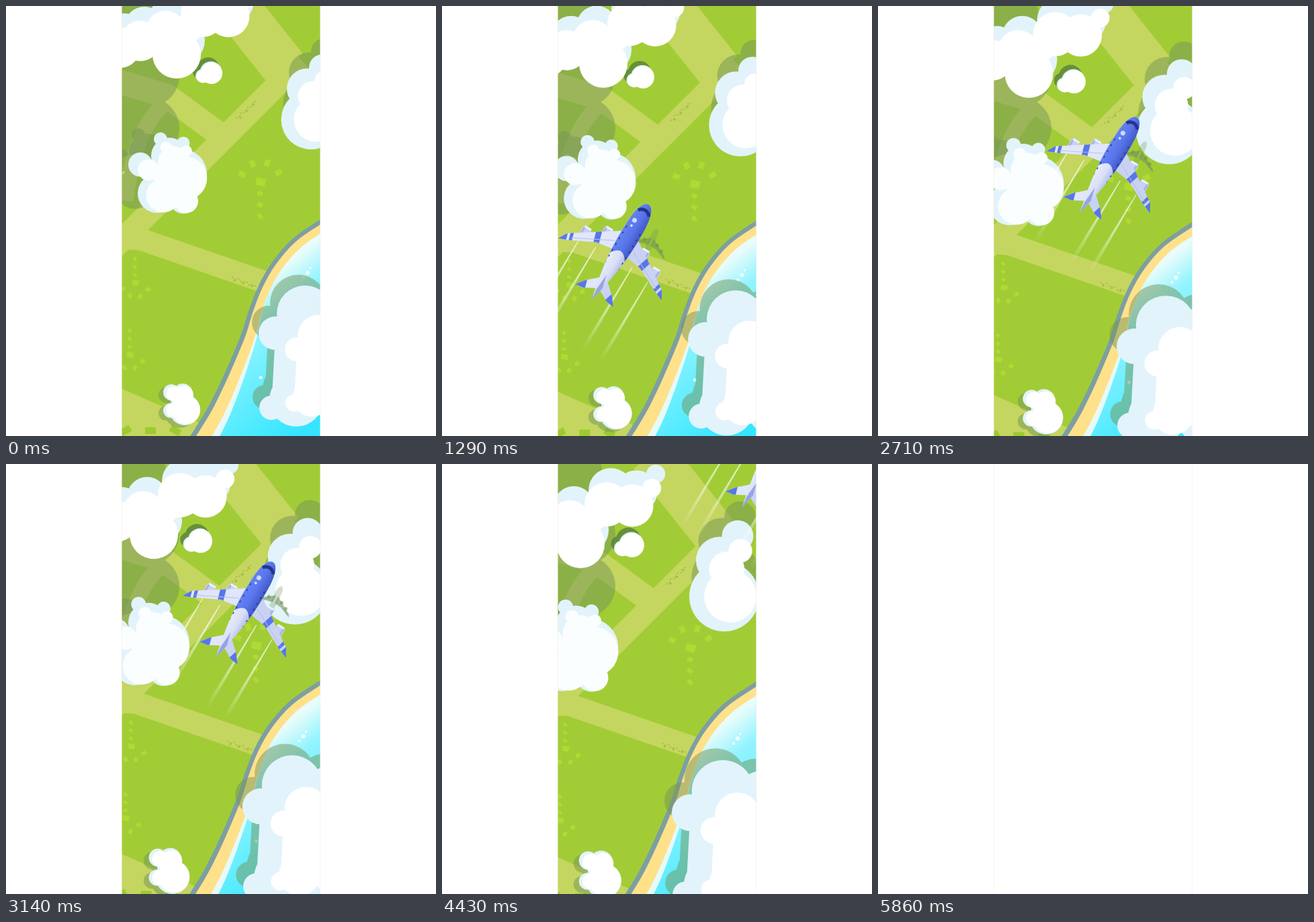
Animation of 640x640 px, one loop 6430 ms. Source, as an HTML page with a canvas:

```html
<!DOCTYPE html>
<html lang="en">
<head>
<meta charset="utf-8">
<title>Plane above the clouds</title>
<style>
html, body { margin: 0; width: 100%; height: 100%; overflow: hidden; background: #fff; }
canvas { display: block; width: 640px; height: 640px; }
</style>
</head>
<body>
<canvas id="stage" width="640" height="640"></canvas>
<script>
const ctx = document.getElementById('stage').getContext('2d');
const LOOP = 6430, STEPS = 90, STEP = LOOP / STEPS;
const LEFT = 172, WIDTH = 296;
const GRASS = '#a2cc36', ROAD = '#c4d65f', HOUSE = '#b0da32', BITS = '#a6bf42';
const PALE = '#e2f3fb', SHADE = 'rgba(118,150,88,.5)';
const BLUE = '#5876ea', NAVY = '#24358c', METAL = '#c9d2f3', WING = '#e0e6fb';

// Monotone cubic interpolation through [time, value] keys.
function track(keys, t) {
  const last = keys.length - 1;
  if (t <= keys[0][0]) return keys[0][1];
  if (t >= keys[last][0]) return keys[last][1];
  let i = 0;
  while (t > keys[i + 1][0]) i++;
  const secant = k => (keys[k + 1][1] - keys[k][1]) / (keys[k + 1][0] - keys[k][0]);
  const slope = k => {
    if (k === 0) return secant(0);
    if (k === last) return secant(last - 1);
    const a = secant(k - 1), b = secant(k);
    return a * b > 0 ? 2 * a * b / (a + b) : 0;
  };
  const [t0, a] = keys[i], [t1, b] = keys[i + 1];
  const h = t1 - t0, u = (t - t0) / h, v = 1 - u;
  return a * (1 + 2 * u) * v * v + b * u * u * (3 - 2 * u) + h * u * v * (slope(i) * v - slope(i + 1) * u);
}

function at(x, y, draw, angle = 0, sx = 1, sy = sx) {
  ctx.save();
  ctx.translate(x, y);
  ctx.rotate(angle);
  ctx.scale(sx, sy);
  draw();
  ctx.restore();
}

function shape(color, pts) {
  ctx.beginPath();
  for (const p of pts) ctx.lineTo(p[0], p[1]);
  ctx.closePath();
  ctx.fillStyle = color;
  ctx.fill();
}

function line(color, width, pts) {
  ctx.beginPath();
  for (const p of pts) ctx.lineTo(...p);
  ctx.strokeStyle = color;
  ctx.lineWidth = width;
  ctx.stroke();
}

// Union of puffs [x, y, r]; `joined` also fills the outline through their centres (clockwise).
function puffs(color, list, joined = false) {
  ctx.beginPath();
  if (joined) {
    for (const [x, y] of list) ctx.lineTo(x, y);
    ctx.closePath();
  }
  for (const [x, y, r] of list) {
    ctx.moveTo(x + r, y);
    ctx.arc(x, y, r, 0, 2 * Math.PI);
  }
  ctx.fillStyle = color;
  ctx.fill();
}

function box(color, x, y, w, h) {
  ctx.fillStyle = color;
  ctx.fillRect(x, y, w, h);
}

function gradient(x0, y0, x1, y1, ...stops) {
  const g = ctx.createLinearGradient(x0, y0, x1, y1);
  for (const [offset, color] of stops) g.addColorStop(offset, color);
  return g;
}

// ---- Ground ----

const ROADS = [
  [34, [[440, 81], [150, 371]]],
  [68, [[321, -26], [415, 92]]],
  [36, [[160, 110], [240, 134], [315, 189]]],
  [33, [[160, 345], [200, 347], [400, 416]]],
  [70, [[150, 598], [330, 677]]]
];

const COAST = [[500, 298], [467, 318], [427, 346], [397, 380], [376, 416], [361, 454], [346, 499], [304, 591], [255, 669]];
const SEA = gradient(415, 370, 551, 546, [.06, '#e8fcfb'], [.26, '#92f4ff'], [.6, '#66eeff'], [1, '#35e5ff']);

// Fills seaward of the coast, moved inland-to-sea by `inset` plus `widen` towards the south.
function shore(color, inset, widen) {
  const pts = COAST.map(([x, y], i) => {
    const a = COAST[Math.max(i - 1, 0)], b = COAST[Math.min(i + 1, COAST.length - 1)];
    const dx = b[0] - a[0], dy = b[1] - a[1], len = Math.hypot(dx, dy);
    const d = inset + widen * Math.max(0, y - 430) / 210;
    return [x + d * dy / len, y - d * dx / len];
  });
  ctx.beginPath();
  ctx.moveTo(...pts[0]);
  pts.slice(1).forEach((b, i) => {
    const a = pts[i], p = pts[Math.max(i - 1, 0)], n = pts[Math.min(i + 2, pts.length - 1)];
    ctx.bezierCurveTo(a[0] + (b[0] - p[0]) / 6, a[1] + (b[1] - p[1]) / 6,
      b[0] - (n[0] - a[0]) / 6, b[1] - (n[1] - a[1]) / 6, ...b);
  });
  ctx.lineTo(540, 680);
  ctx.lineTo(540, 300);
  ctx.fillStyle = color;
  ctx.fill();
}

// A main house, a row of houses in the direction of `s` and an arc of houses opposite.
function village(x, y, s) {
  const house = (dx, dy, size, angle) => at(x + dx, y + dy, () => box(HOUSE, -size / 2, -size * .4, size, size * .8), angle);
  const k = Math.abs(s);
  house(0, 0, 14 * k, .2);
  for (let i = 0; i < 4; i++) {
    const a = -2.74 + i * .75;
    house(30 * k * Math.cos(a), 30 * s * Math.sin(a), 10 * k, a);
    if (i) house(-1, 17 * s * i, 8 * k, i * .3);
  }
}

function roadBits(x, y, angle) {
  at(x, y, () => {
    for (let i = 0; i < 9; i++) box(BITS, i * 4.5, Math.sin(i * 2.3) * 1.5, 3, i % 3 === 1 ? 4 : 1.5);
  }, angle);
}

function ground() {
  for (const [width, pts] of ROADS) line(ROAD, width, pts);
  ctx.beginPath();
  ctx.moveTo(232, 148);
  ctx.quadraticCurveTo(190, 190, 178, 290);
  ctx.lineWidth = 23;
  ctx.stroke();

  village(379, 262, 1);
  village(193, 412, -.7);
  village(185, 519, -.7);
  for (let i = 0; i < 3; i++) at(178 + 37 * i, 632, () => box('#9dca30', -8, -5, 16, 10), i * .5 - .5);
  roadBits(342, 167, -.72);
  roadBits(336, 403, .37);

  shore('#7d9fa2', 0, 0);
  shore('#ffe18a', 6.5, 1);
  shore('#e6faf9', 18, 10);
  shore(SEA, 18, 21);
  puffs('rgba(255,255,255,.85)', [[449, 397, 3], [453, 390, 1.8], [443, 404, 2], [379, 553, 2.5]]);
}

// ---- Clouds ----
// Puffs are relative to `pos`; the cloud drifts by `v` px/s and grows by `grow` per second.
// `core` is [scale, dx, dy] of the white part, `shade` the offset of the shadow.
const CLOUDS = [
  { pos: [401, 487], v: [-7.1, 7.2], grow: .0226, core: [.72, 32, 24], shade: [-10, -16],
    body: [[0, 0, 25], [44, -29, 42], [99, -17, 40], [99, 98, 40], [31, 99, 40], [-6, 111, 18]] },
  { pos: [265, 601], v: [-5.8, 4.3], grow: .0327, core: [.92, 2, 0], shade: [-7, 4],
    body: [[1, 0, 23], [-20, 1, 11], [-19, -26, 12], [-2, -24, 15]] },
  { pos: [230, 198], v: [-10.4, 3.4], grow: .0305, core: [.88, 8.5, 12.5], shade: [-33, -6], white: '#fafeff',
    body: [[0, 0, 10], [34, 6, 9.5], [32, 52, 37], [34, 91, 20], [-5, 81, 29], [-30, 38, 18], [13, 25, 27]] },
  { pos: [471, 92], v: [-7, 3.4], grow: .0384, core: [.75, 3.5, 19], shade: [3, -24],
    body: [[0, 0, 20], [-17, 77, 44.5], [-23, 31, 30]] },
  { pos: [306, 99], v: [-5.2, 4.7], grow: .0271, core: [.97, 1, 1], shade: [-4, -6], dark: 'rgba(82,124,58,.75)',
    body: [[-1, 0, 16.5], [-14, 5, 10]] },
  { pos: [254, 72], v: [-10.8, 10.6], grow: 0, core: [1, -6, 21],
    body: [[-78, -31, 30], [-48, -41, 30], [-10, -56, 30], [45, -80, 33], [112, -104, 14], [83, -78, 31.5], [6, -21, 36]] }
];

function inCloud({ pos, v, grow }, t, draw) {
  const s = t / 1000;
  at(pos[0] + v[0] * s, pos[1] + v[1] * s, draw, 0, 1 + grow * s);
}

function clouds(t) {
  puffs(SHADE, [[212, 182, 46], [212, 104, 46], [165, 178, 48], [165, 105, 50], [185, 20, 55]]);
  for (const c of CLOUDS) {
    if (c.shade) inCloud(c, t, () => at(...c.shade, () => puffs(c.dark || SHADE, c.body, true)));
  }
  for (const c of CLOUDS) inCloud(c, t, () => {
    const [scale, dx, dy] = c.core;
    puffs(PALE, c.body, true);
    at(dx, dy, () => puffs(c.white || '#fff', c.body, true), 0, scale);
  });
}

// ---- Plane ----
// Drawn nose up with the nose tip at the origin; both halves mirror each other.
const TILT = .54;
const WING_SHAPE = [[5, 48], [82, 99], [90, 112.5], [76, 107], [38, 88], [5, 83]];
const TAIL_SHAPE = [[0, 124], [23, 145], [33, 158], [20, 156], [0, 145]];
const ENGINES = [[32, 68], [60, 84]];

function bodyPath() {
  ctx.beginPath();
  ctx.moveTo(0, 0);
  for (const side of [1, -1]) {
    const x = v => v * side;
    if (side > 0) {
      ctx.bezierCurveTo(x(9), 1, x(13), 16, x(14), 34);
      ctx.bezierCurveTo(x(16), 75, x(13), 110, 0, 165);
    } else {
      ctx.bezierCurveTo(x(13), 110, x(16), 75, x(14), 34);
      ctx.bezierCurveTo(x(13), 16, x(9), 1, 0, 0);
    }
  }
}

function bothSides(draw) {
  for (const side of [-1, 1]) at(0, 0, () => draw(side), 0, side, 1);
}

function engine(x, y) {
  ctx.fillStyle = METAL;
  ctx.beginPath();
  ctx.roundRect(x - 7, y - 9, 14, 20, 4);
  ctx.fill();
  box('#a9b5e2', x + 3, y - 7, 3, 17);
  box('#eef1fd', x - 6, y - 9, 11, 3);
}

// A wing or tail plane with blue bands [x, width] that lean inwards.
function fin(color, pts, bands) {
  shape(color, pts);
  ctx.save();
  ctx.clip();
  ctx.transform(1, 0, -.3, 1, 24, 0);
  for (const [x, w] of bands) box(BLUE, x, 40, w, 130);
  ctx.restore();
}

function fuselage() {
  bodyPath();
  ctx.save();
  ctx.clip();
  box(gradient(-14, 0, 15, 0, [0, '#e8ecfd'], [.55, '#d9dff8'], [1, '#aab5e6']), -20, 0, 40, 170);
  ctx.fillStyle = gradient(-14, 0, 15, 0, [0, '#6482f2'], [.5, BLUE], [1, '#3f56c4']);
  ctx.beginPath();
  ctx.moveTo(-20, 0);
  ctx.lineTo(20, 0);
  ctx.lineTo(20, 106);
  ctx.quadraticCurveTo(0, 56, -20, 106);
  ctx.fill();
  ctx.strokeStyle = NAVY;
  ctx.lineWidth = 5;
  ctx.beginPath();
  ctx.arc(0, 21, 11, 3.7, 5.75);
  ctx.stroke();
  for (let y = 44; y < 114; y += 10) bothSides(() => box(NAVY, 11, y, 1.5, 3));
  ctx.restore();
  puffs('#cbdcff', [[-6, 31, 3.5], [-6, 40, 2]]);
  shape('#96a4e2', [[0, 122], [5, 142], [0, 167], [-2, 148]]);
}

function plane() {
  bothSides(side => {
    const color = side < 0 ? WING : METAL;
    for (const [x, y] of ENGINES) engine(x, y);
    fin(color, WING_SHAPE, [[36, 9], [78, 5], [87, 30]]);
    line('#b4bfe8', 1, [[16, 72], [74, 102]]);
    fin(color, TAIL_SHAPE, [[40, 30]]);
  });
  fuselage();
}

function silhouette() {
  bothSides(() => {
    shape('#709258', WING_SHAPE);
    shape('#709258', TAIL_SHAPE);
    puffs('#709258', ENGINES.map(([x, y]) => [x, y, 8]));
  });
  bodyPath();
  ctx.fill();
}

function trails() {
  const fade = gradient(0, 95, 0, 236, [0, 'rgba(255,255,255,.85)'], [.5, 'rgba(255,255,255,.5)'], [1, 'rgba(255,255,255,0)']);
  for (const x of [-62, -35, 27, 58]) {
    const y = 88 + Math.abs(x) * .2;
    shape(fade, [[x - .5, y], [x + .5, y], [x + 3, 236], [x - 3, 236]]);
  }
}

const CLIMB = [[0, -300], [1290, 0], [2710, 129], [3640, 176], [4430, 373], [5000, 690]];

function flight(t) {
  const climb = track(CLIMB, t);
  at(308 + climb * .6, 295 - climb, () => {
    ctx.globalAlpha = .6;
    at(13, 36, silhouette, TILT - .09, .33);
    ctx.globalAlpha = 1;
    at(0, 0, () => { trails(); plane(); }, TILT);
  });
}

// ---- Closing clouds ----

const UPPER = [[4950, -12], [5290, 119], [5640, 279], [5860, 400]];
const LOWER = [[4900, 660], [5290, 497], [5640, 374], [5860, 300]];

// A bank of equal puffs whose crest lies at y; `side` points away from the gap.
function bank(color, x0, gap, r, y, side) {
  const row = [];
  for (let i = 0; i < 6; i++) row.push([x0 + gap * i, y + side * (r + 3 + 3 * Math.sin(i * 2.4)), r]);
  puffs(color, row);
  const edge = y + side * r * .75;
  box(color, LEFT, side < 0 ? edge - 640 : edge, WIDTH, 640);
}

function curtain(t) {
  if (t < LOWER[0][0]) return;
  const low = track(LOWER, t);
  bank(PALE, 203, 63, 38, low - 2, 1);
  bank('#fff', 190, 69, 42, low + 20, 1);
  bank('#fff', 187, 56, 36, track(UPPER, t) + 3, -1);
}

function render(t) {
  box('#fff', 0, 0, 640, 640);
  ctx.save();
  ctx.beginPath();
  ctx.rect(LEFT, 0, WIDTH, 640);
  ctx.clip();
  box(GRASS, LEFT, 0, WIDTH, 640);
  const drift = Math.min(t / 4700, 1);
  at(-9.5 * drift, 12.5 * drift, ground);
  clouds(t);
  flight(t);
  curtain(t);
  ctx.restore();
  box('rgba(246,238,214,.6)', LEFT, 0, 1, 640);
  box('rgba(235,238,238,.6)', LEFT + WIDTH - 1, 0, 1, 640);
}

const start = performance.now();
function tick() {
  const t = (performance.now() - start) % LOOP;
  render(Math.floor((t + 4) / STEP) % STEPS * STEP);
  requestAnimationFrame(tick);
}
tick();
</script>
</body>
</html>
```
